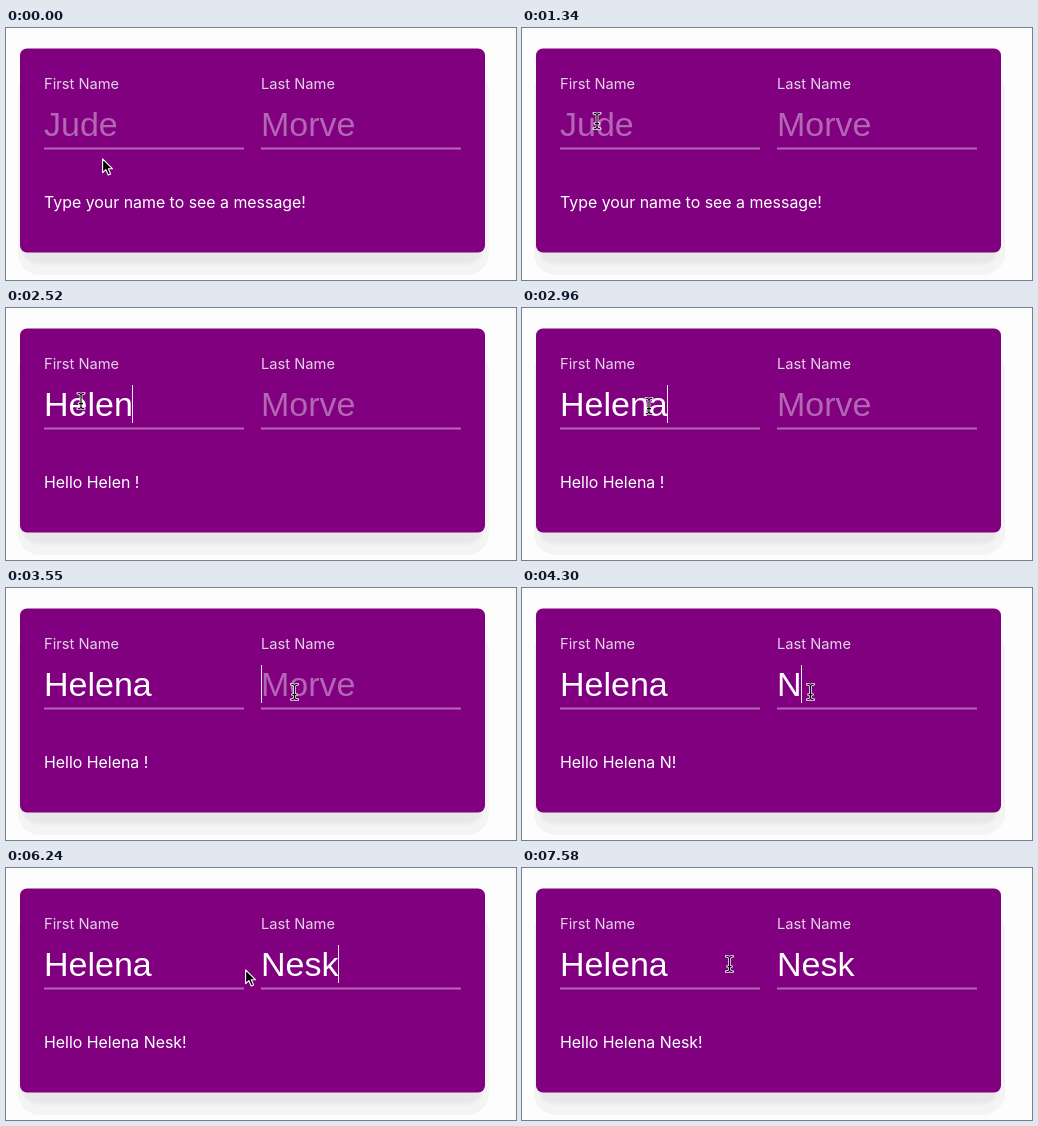
Write an HTML page that moves like this. It is 510 by 252 pixels and loops after 8000 ms.

```html
<!DOCTYPE html>
<html lang="en">
<head>
<meta charset="utf-8">
<title>Name form</title>
<style>
  html, body { margin: 0; width: 100%; height: 100%; overflow: hidden; background: #fdfdfd; }
  svg { display: block; width: 510px; height: 252px; }
  text { fill: #fff; white-space: pre; font-family: Inter, Roboto, sans-serif; }
  .label { font-size: 14.7px; fill-opacity: .82; }
  .field { font-size: 34px; font-family: "Liberation Sans", Arial, sans-serif; }
  .field.empty { fill-opacity: .4; }
  .message { font-size: 15.9px; }
  .line { fill: #fff; fill-opacity: .4; }
  .halo { fill: none; stroke: #fff; stroke-width: 2.8; stroke-linecap: round; stroke-opacity: .85; }
  .stem { fill: none; stroke: #000; stroke-width: 1.1; }
</style>
</head>
<body>
<svg viewBox="0 0 510 252">
  <defs>
    <filter id="soft" x="-5%" y="-20%" width="110%" height="140%"><feGaussianBlur stdDeviation="1.5"/></filter>
    <path id="beamPath" d="M-3.2-7.7Q0-7.7 0-5.6Q0-7.7 3.2-7.7M0-5.6V5.6M-3.2 7.7Q0 7.7 0 5.6Q0 7.7 3.2 7.7M-2 2.6H2"/>
  </defs>

  <rect x="12" y="42" width="471" height="205" rx="22" fill="#f4f4f4"/>
  <rect x="17" y="150" width="459" height="86" rx="15" fill="#e8e8e8" filter="url(#soft)"/>
  <rect x="14" y="20.5" width="465" height="204" rx="7" fill="#800080"/>

  <text class="label" x="38" y="61">First Name</text>
  <text class="label" x="255" y="61">Last Name</text>
  <text class="field" id="first" x="38" y="108"></text>
  <text class="field" id="last" x="255" y="108"></text>
  <rect class="line" x="38" y="119.5" width="200" height="2"/>
  <rect class="line" x="255" y="119.5" width="200" height="2"/>
  <text class="message" id="message" x="38" y="180"></text>

  <rect id="caret" y="77" width="1" height="38" fill="#fff" fill-opacity=".9"/>
  <g id="arrow">
    <path d="M.6.8V14.7L3.9 11.6L6.2 17L8.6 16L6.3 10.7H10.4Z" fill="#000" stroke="#fff" stroke-width="1.1" stroke-linejoin="round"/>
  </g>
  <g id="beam">
    <use href="#beamPath" class="halo"/>
    <use href="#beamPath" class="stem"/>
  </g>
</svg>
<script>
const LOOP = 8000;
const FIRST = { name: "Helena", hint: "Jude", x: 38 };
const LAST = { name: "Nesk", hint: "Morve", x: 255 };

// time of each key press
const firstKeys = [1630, 1930, 2080, 2220, 2520, 2660];
const lastKeys = [4300, 4750, 4900, 5200];

// [time, field holding the caret or null]
const caretSteps = [
  [0, null], [740, FIRST], [1340, null], [1630, FIRST],
  [3400, LAST], [4150, null], [4300, LAST], [5650, null],
  [6240, LAST], [6680, null], [7130, LAST], [7580, null]
];

// [time, pointer shape, x, y]
const pointerSteps = [
  [0, "arrow", 96, 130], [300, "beam", 77, 98], [450, "beam", 75, 93],
  [2960, "beam", 127, 98], [3110, "beam", 190, 102], [3250, "arrow", 244, 103],
  [3400, "beam", 282, 104], [3550, "beam", 288.5, 104],
  [5950, "beam", 280, 103], [6090, "beam", 262, 102], [6240, "arrow", 239, 101],
  [6380, "beam", 221, 99], [6530, "beam", 211, 97], [6680, "beam", 207.5, 96]
];

const el = id => document.getElementById(id);
const at = (steps, t) => steps.findLast(s => s[0] <= t);
const typed = (field, keys, t) => field.name.slice(0, keys.filter(k => k <= t).length);

function setField(node, value, hint) {
  node.textContent = value || hint;
  node.classList.toggle("empty", !value);
  return value ? node.getComputedTextLength() : 0;
}

function draw(t) {
  const first = typed(FIRST, firstKeys, t);
  const last = typed(LAST, lastKeys, t);
  const firstWidth = setField(el("first"), first, FIRST.hint);
  const lastWidth = setField(el("last"), last, LAST.hint);
  el("message").textContent = first || last
    ? `Hello ${first} ${last}!`
    : "Type your name to see a message!";

  const focus = at(caretSteps, t)[1];
  el("caret").style.display = focus ? "" : "none";
  if (focus) {
    const width = focus === FIRST ? firstWidth : lastWidth;
    el("caret").setAttribute("x", Math.floor(focus.x + width));
  }

  const [, shape, x, y] = at(pointerSteps, t);
  for (const id of ["arrow", "beam"]) {
    el(id).style.display = id === shape ? "" : "none";
    el(id).setAttribute("transform", `translate(${x} ${y})`);
  }
}

const start = performance.now();
function tick() {
  draw((performance.now() - start) % LOOP);
  requestAnimationFrame(tick);
}
tick();
</script>
</body>
</html>
```
